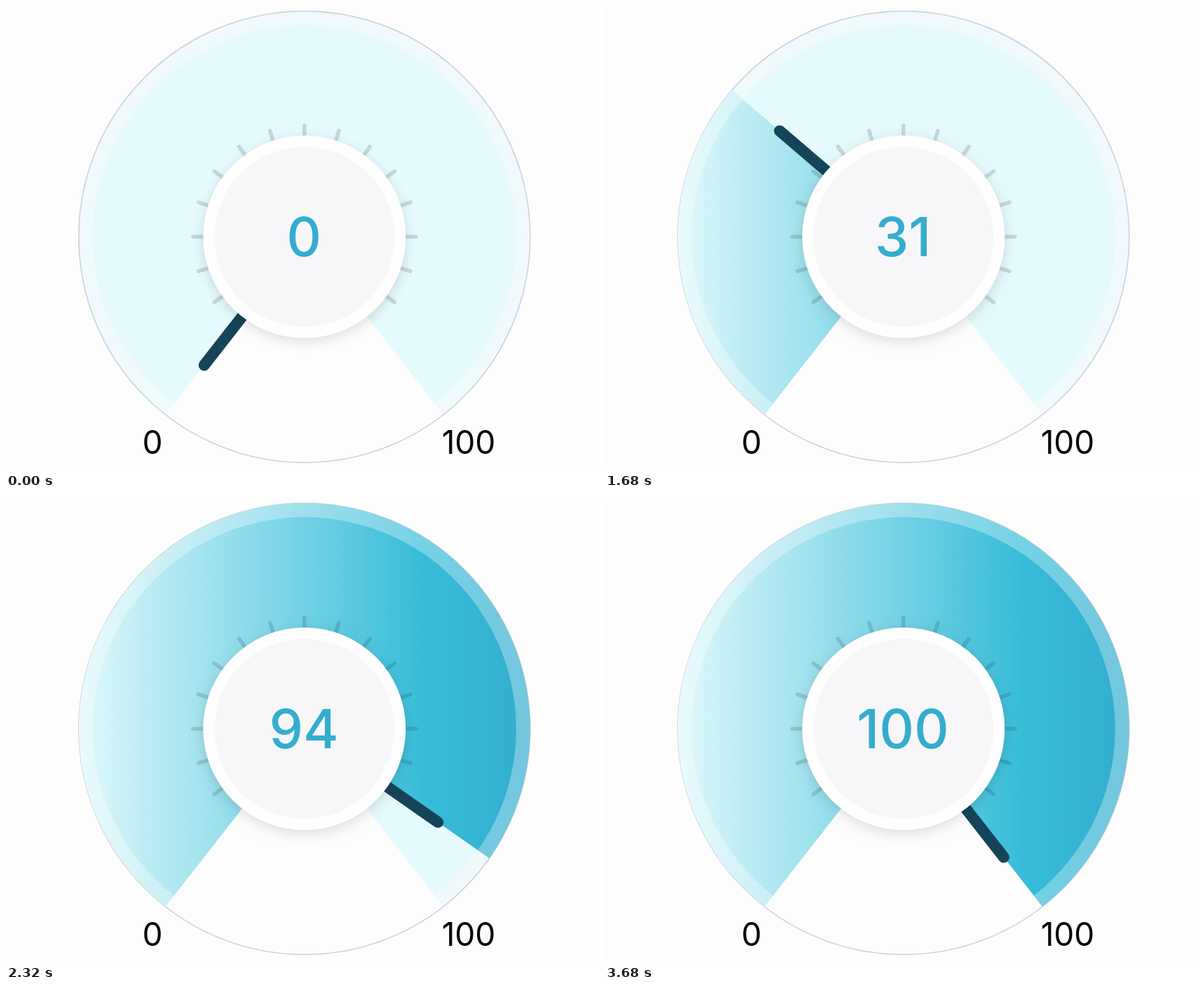
These frames come from a looping animation (846 by 662 pixels, 3.76 s). An HTML page with a canvas:

```html
<!DOCTYPE html>
<html lang="en">
<head>
<meta charset="utf-8">
<title>Gauge</title>
<style>
  html, body { margin: 0; width: 846px; height: 662px; overflow: hidden; background: #fdfdfd; }
  canvas { display: block; }
</style>
</head>
<body>
<canvas id="stage" width="846" height="662"></canvas>
<script>
const ctx = document.getElementById('stage').getContext('2d');
const LOOP = 3760, STEP = 80;
const SWEEP_START = 813, SWEEP_TIME = 2000, COUNTER_LAG = 13;
const CX = 425.8, CY = 329.3, RADIUS = 322, RING = 302;
const rad = deg => deg * Math.PI / 180;
const START = rad(128), SWEEP = rad(284);

const fillGradient = ctx.createLinearGradient(CX - RADIUS, 0, CX + RADIUS, 0);
fillGradient.addColorStop(0, '#dff8fb');
fillGradient.addColorStop(0.77, '#36bcd8');
fillGradient.addColorStop(1, '#34acce');

function progressAt(time) {
  const p = Math.min(1, Math.max(0, (time - SWEEP_START) / SWEEP_TIME));
  return p < 0.5 ? 4 * p ** 3 : 1 - 4 * (1 - p) ** 3;
}

function disc(radius, color) {
  ctx.beginPath();
  ctx.arc(CX, CY, radius, 0, 2 * Math.PI);
  ctx.fillStyle = color;
  ctx.fill();
}

function sector(inner, outer, end, color) {
  ctx.beginPath();
  ctx.arc(CX, CY, outer, START, end);
  ctx.arc(CX, CY, inner, end, START, true);
  ctx.closePath();
  ctx.fillStyle = color;
  ctx.fill();
}

function spoke(angle, from, to, width, color) {
  const c = Math.cos(angle), s = Math.sin(angle);
  ctx.beginPath();
  ctx.moveTo(CX + from * c, CY + from * s);
  ctx.lineTo(CX + to * c, CY + to * s);
  ctx.lineCap = 'round';
  ctx.lineWidth = width;
  ctx.strokeStyle = color;
  ctx.stroke();
}

function label(text, x, y, font, color) {
  ctx.font = font + ' Inter, sans-serif';
  ctx.textAlign = 'center';
  ctx.fillStyle = color;
  ctx.fillText(text, x, y);
}

function drawHub() {
  ctx.save();
  ctx.shadowColor = 'rgba(0, 0, 0, 0.13)';
  ctx.shadowBlur = 18;
  ctx.shadowOffsetY = 5;
  disc(144.5, '#fefefe');
  ctx.restore();
  disc(128.5, '#f7f7fa');
}

function draw(time) {
  const progress = progressAt(time);
  const angle = START + SWEEP * progress;

  ctx.fillStyle = '#fdfdfd';
  ctx.fillRect(0, 0, 846, 662);

  sector(100, RADIUS, START + SWEEP, '#f0fafc');
  sector(100, RING, START + SWEEP, '#e5fafc');
  ctx.beginPath();
  ctx.arc(CX, CY, RADIUS, 0, 2 * Math.PI);
  ctx.lineWidth = 1.7;
  ctx.strokeStyle = '#d0d3da';
  ctx.stroke();

  if (progress > 0) {
    sector(100, RADIUS, angle, fillGradient);
    sector(RING, RADIUS, angle, 'rgba(255, 255, 255, 0.31)');
  }

  for (let deg = -126; deg <= 126; deg += 18) {
    spoke(rad(deg - 90), 140, 159, 5.5, 'rgba(15, 45, 60, 0.16)');
  }
  spoke(angle, 120, 232.5, 16, '#154458');
  drawHub();

  const value = Math.round(100 * progressAt(time - COUNTER_LAG));
  label(value, 425, 356.7, '500 77px', '#34adcd');
  label('0', 209, 639, '400 46px', '#000');
  label('100', 660, 639, '400 46px', '#000');
}

function tick(now) {
  draw(Math.floor((now % LOOP + 1) / STEP) * STEP % LOOP);
  requestAnimationFrame(tick);
}
draw(0);
requestAnimationFrame(tick);
</script>
</body>
</html>
```
